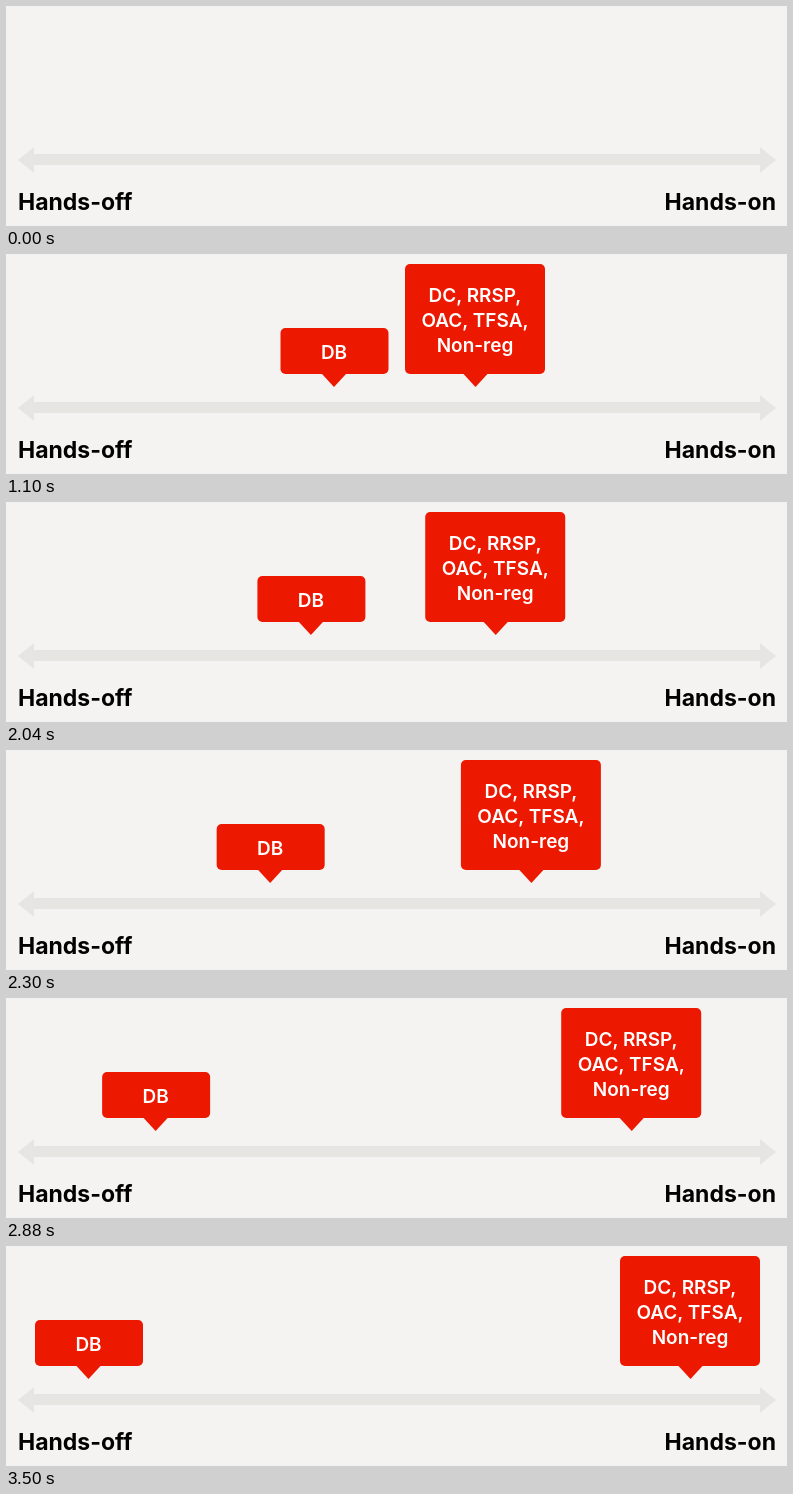
These frames come from a looping animation (781 px wide and 220 px high, 4.82 s). An HTML page:

```html
<!DOCTYPE html>
<html lang="en">
<head>
<meta charset="utf-8">
<title>Hands-off to hands-on</title>
<style>
  html, body { margin: 0; width: 100%; height: 100%; overflow: hidden; background: #f4f3f1; }
  svg { display: block; width: 781px; height: 220px; }
  text { font-family: Inter, sans-serif; }
  .end { font-size: 23px; font-weight: 700; fill: #000; }
  .tag { fill: #ec1800; }
  .tag text { font-size: 19px; font-weight: 600; fill: #fff; text-anchor: middle; }
</style>
</head>
<body>
<svg viewBox="0 0 781 220">
  <clipPath id="above"><rect width="781" height="137"/></clipPath>

  <path fill="#e7e5e1" d="M12 154 L28 141 V148 H754 V141 L770 154 L754 167 V159 H28 V167 Z"/>
  <text class="end" x="12" y="204">Hands-off</text>
  <text class="end" x="770" y="204" text-anchor="end">Hands-on</text>

  <g clip-path="url(#above)">
    <g class="tag" id="db">
      <rect y="74" width="108" height="46" rx="5"/>
      <path d="M41.5 120 H65.5 L53.5 133 Z"/>
      <text x="53.5" y="105">DB</text>
    </g>
    <g class="tag" id="others">
      <rect y="10" width="140" height="110" rx="5"/>
      <path d="M58.5 120 H82.5 L70.5 133 Z"/>
      <text x="70" y="48">DC, RRSP,</text>
      <text x="70" y="73">OAC, TFSA,</text>
      <text x="70" y="98">Non-reg</text>
    </g>
  </g>
</svg>
<script>
  const LOOP = 4820, RISE = 900, RISE_DISTANCE = 139;
  const SLIDE_START = 1700, SLIDE = 1800;

  const tags = [
    { node: document.getElementById('db'), riseStart: 0, from: 274.5, to: 29 },
    { node: document.getElementById('others'), riseStart: 200, from: 399, to: 614 },
  ];

  function ease(time, start, duration) {
    const u = Math.min(1, Math.max(0, (time - start) / duration));
    return u * u * (3 - 2 * u);
  }

  function draw(time) {
    const slide = ease(time, SLIDE_START, SLIDE);
    for (const { node, riseStart, from, to } of tags) {
      const x = from + (to - from) * slide;
      const y = RISE_DISTANCE * (1 - ease(time, riseStart, RISE));
      node.setAttribute('transform', `translate(${x} ${y})`);
    }
  }

  const origin = performance.now();
  function frame() {
    draw((performance.now() - origin) % LOOP);
    requestAnimationFrame(frame);
  }
  draw(0);
  requestAnimationFrame(frame);
</script>
</body>
</html>
```
